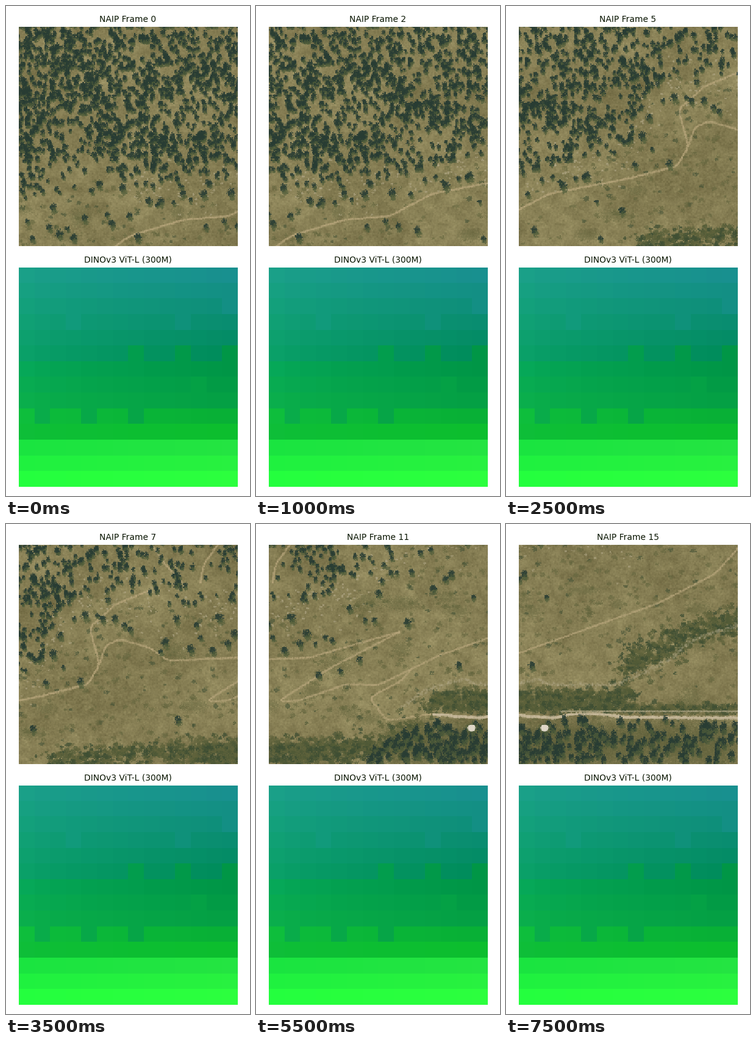
Recreate the animation shown at these times as a matplotlib script. Size 400 by 800 pixels, loop 8000 ms.

```python
import numpy as np
import matplotlib.pyplot as plt
from matplotlib.animation import FuncAnimation
from matplotlib.colors import to_rgb

FRAMES, INTERVAL = 16, 500
SIDE, SCALE, STEP = 224, 1.603, 45.42   # view in cells, pixels per cell, cells per frame
LEFT, TOP = 21, 34                      # stage position of the aerial view
WIDTH = SIDE + int(np.ceil(STEP * (FRAMES - 1))) + 1
EAST, SOUTH = LEFT + WIDTH * SCALE, TOP + SIDE * SCALE

rng = np.random.default_rng(7)

GROUND = np.array([134, 126, 84])
SHADOW, CROWN = (40, 60, 51), (80, 93, 58)
SCRUB, DARK_SCRUB = (96, 99, 60), (62, 78, 51)
PATH, ROAD, ROCK = (184, 166, 124), (200, 186, 156), (178, 168, 136)


def smooth_noise(sigma):
    """Unit-variance noise blurred to the given length in cells."""
    fy = np.fft.fftfreq(SIDE)[:, None]
    fx = np.fft.rfftfreq(WIDTH)[None]
    spectrum = np.fft.rfft2(rng.normal(size=(SIDE, WIDTH)))
    spectrum *= np.exp(-2 * (np.pi * sigma) ** 2 * (fx ** 2 + fy ** 2))
    field = np.fft.irfft2(spectrum, s=(SIDE, WIDTH))
    return field / field.std()


land = GROUND + (4.5 * smooth_noise(.5) + 4 * smooth_noise(3)
                 + 4 * smooth_noise(22))[..., None] * [1, .95, .8]
clumps = smooth_noise(8)


def cell(x, y):
    return (x - LEFT) / SCALE, (y - TOP) / SCALE


def blob(x, y, rx, ry, color, alpha=1.0, rough=.3, edge=2.0):
    """Blend a ragged ellipse, given in stage pixels, into the land."""
    cx, cy = cell(x, y)
    rx, ry = rx / SCALE, ry / SCALE
    x0, x1 = max(0, int(cx - rx - 1)), min(WIDTH, int(cx + rx + 3))
    y0, y1 = max(0, int(cy - ry - 1)), min(SIDE, int(cy + ry + 3))
    if x0 >= x1 or y0 >= y1:
        return
    gx, gy = np.arange(x0, x1)[None] + .5, np.arange(y0, y1)[:, None] + .5
    d = ((gx - cx) / rx) ** 2 + ((gy - cy) / ry) ** 2
    d = d + rough * rng.normal(size=d.shape)
    mask = (np.clip((1 - d) * edge, 0, 1) * alpha)[..., None]
    view = land[y0:y1, x0:x1]
    view += mask * (np.array(color) - view)


def tree(x, y, r=4.5, tall=1.35):
    blob(x, y - r * .4, r, r * tall, SHADOW, .9)
    blob(x + r * .35, y + r * .6, r * .85, r * .95, CROWN, .75)


def along(points, spacing=1.0):
    """Evenly spaced points on a softened polyline."""
    p = np.array(points, float)
    s = np.r_[0, np.cumsum(np.hypot(*np.diff(p, axis=0).T))]
    t = np.arange(0, s[-1], spacing)
    n = max(3, int(16 / spacing))
    padding = (n // 2, n - 1 - n // 2)
    return np.transpose([
        np.convolve(np.pad(np.interp(t, s, axis), padding, mode="edge"),
                    np.ones(n) / n, "valid") for axis in p.T])


def trail(points, radius=1.8, alpha=.36, color=PATH, jitter=.5):
    for x, y in along(points) + rng.normal(0, jitter, (len(along(points)), 2)):
        blob(x, y, radius, radius, color, alpha)


def scrub_belt(points, spread, density):
    for x, y in along(points, 1 / density):
        r = rng.uniform(2, 5)
        color = (SCRUB, (82, 91, 55), DARK_SCRUB)[rng.integers(3)]
        blob(*rng.normal((x, y), spread), r * 1.2, r, color, .75, .4)


forest_edge = np.array([(21, 318), (100, 305), (160, 268), (230, 302), (330, 295),
                        (450, 260), (560, 242), (610, 140), (660, 108), (820, 148),
                        (960, 110), (1080, 20)])


def depth(x, y):
    """How far a point lies inside the northern forest."""
    return np.interp(x, *forest_edge.T) - y


# Scrub patches, bushes and pale stones on the open grass
for _ in range(45):
    x, y = rng.uniform(LEFT, EAST), rng.uniform(TOP, SOUTH)
    if depth(x, y) < -15:
        blob(x, y, rng.uniform(10, 34), rng.uniform(8, 20), SCRUB, .4, .4, 1.2)
for _ in range(1500):
    x, y = rng.uniform(LEFT, EAST), rng.uniform(TOP, SOUTH)
    if depth(x, y) < 0:
        r = rng.uniform(1.5, 4.5)
        blob(x, y, r * 1.25, r, SCRUB if rng.random() < .8 else DARK_SCRUB, .55, .4)
for x in rng.uniform(200, 1300, 420):
    y = np.interp(x, *forest_edge.T) + rng.normal(5, 22)
    blob(x, y, 2.2, 1.7, ROCK, .6, .4)

# Footpaths: the main one, its fork with a hairpin, a loop, and two northern spurs
trail([(178, 394), (204, 376), (291, 350), (366, 344), (434, 308), (564, 283),
       (645, 262), (663, 230), (647, 170), (690, 132), (748, 108)], alpha=.42)
trail([(662, 232), (673, 200), (695, 189), (745, 203), (776, 224), (890, 219),
       (1040, 176), (925, 235), (840, 290), (870, 290), (950, 262), (1002, 264),
       (1101, 216), (1202, 180), (1342, 130), (1435, 82), (1474, 38)])
trail([(1056, 238), (1041, 256), (988, 285), (1016, 322), (1092, 311)])
trail([(748, 34), (772, 68), (808, 108)])
trail([(858, 34), (834, 66), (828, 100)])

# Ground of the southern wood, scrub belts and the stony stream
for x in np.arange(1020, EAST, 12):
    blob(x, 360, 28, 42, (94, 96, 58), .35, .3, 1.2)
scrub_belt([(580, 388), (744, 374), (1000, 366)], 9, 1.6)
scrub_belt([(800, 380), (1000, 368), (1070, 340)], 14, 1.8)
scrub_belt([(1085, 297), (1140, 288), (1300, 282)], 8, 2.6)
scrub_belt([(1113, 300), (EAST, 303)], 4, 1)
scrub_belt([(1280, 238), (1392, 180), (EAST, 160)], 13, 2.6)
trail([(1041, 300), (1081, 272), (1142, 254), (1165, 264), (1272, 264),
       (1362, 222), (1392, 192), (EAST, 165)], 1.8, .28, ROCK, 2)

# Road with its fainter northern edge
trail([(1090, 312), (1172, 318), (1200, 311), (1245, 311), (1290, 317), (EAST, 318)],
      2.6, .5, ROAD)
trail([(1180, 307), (EAST, 307)], 1.7, .35, ROCK, .3)

# Northern forest: thins out at its lower edge and toward the east
candidates = np.c_[rng.uniform(TOP - 4, 330, 6600), rng.uniform(LEFT - 3, 1080, 6600)]
for y, x in candidates[candidates[:, 0].argsort()]:
    cx, cy = (int(v) for v in np.clip(cell(x, y), 0, (WIDTH - 1, SIDE - 1)))
    inside = depth(x, y)
    chance = np.clip(.3 + inside / 90, 0, 1) * np.interp(x, [250, 600, 1000], [1, .65, .35])
    if inside > 0 and rng.random() < chance * np.clip(.85 + .3 * clumps[cy, cx], .2, 1):
        tree(x, y, rng.uniform(2.8, 4.8), rng.uniform(1.1, 1.6))

# Lone trees, mostly not far below the forest
for x in np.arange(30, 1170, 12):
    y = np.interp(x, *forest_edge.T) + 12 + rng.exponential(65)
    if y < SOUTH:
        tree(x + rng.uniform(-6, 6), y, rng.uniform(3.8, 7), 1.1)

# Southern wood: taller trees, closest together in the west
for _ in range(380):
    x, y = rng.uniform(985, EAST), rng.uniform(320, SOUTH)
    start = np.interp(x, [985, 1100], [372, 322])
    if y > start and rng.random() < np.interp(x, [1180, 1260], [.85, .5]):
        tree(x, y, rng.uniform(3.5, 6.5), rng.uniform(1.4, 2.1))

# House
blob(1155, 334, 11, 9, CROWN, .8)
blob(1155, 334, 7, 6, (222, 214, 198), 1, 0, 4)
land = np.clip(land, 0, 255).astype(np.uint8)

# Feature grid: left and right colours at key rows, blended between
KEYS = {0: "1aa088 18908f", 5: "0aa068 008c5c", 6: "06a858 009646",
        8: "0aae4c 04a044", 9: "0ebe3c 08b036", 10: "0ebe38 0cbe2e",
        11: "1ae440 24e442", 13: "24ff3e 2cff3e"}
ends = np.array([[to_rgb("#" + c) for c in pair.split()] for pair in KEYS.values()])
ends = ends.reshape(len(KEYS), 6)
rows = np.transpose([np.interp(range(14), list(KEYS), channel) for channel in ends.T])
ramp = np.linspace(0, 1, 14)[None, :, None] ** .8
grid = rows[:, None, :3] * (1 - ramp) + rows[:, None, 3:] * ramp

# A few cells take the colour of the neighbouring row
for row, neighbour, columns in [(2, 1, [13]), (3, 2, [3, 10]), (5, 6, [7, 10, 13]),
                                (7, 8, [11]), (9, 8, [1, 4, 7])]:
    grid[row, columns] = grid[neighbour, columns]

plt.rcParams["font.family"] = "DejaVu Sans"
fig, (top_ax, bottom_ax) = plt.subplots(2, 1, figsize=(4, 8), dpi=100)


def panel(ax, image, title):
    picture = ax.imshow(image, interpolation="nearest")
    ax.axis("off")
    return picture, ax.set_title(title, fontsize=10, color="#081400")


aerial, heading = panel(top_ax, land[:, :SIDE], "NAIP Frame 0")
panel(bottom_ax, grid, "DINOv3 ViT-L (300M)")
fig.tight_layout()


def update(n):
    start = round(STEP * n)
    aerial.set_data(land[:, start:start + SIDE])
    heading.set_text(f"NAIP Frame {n}")
    return aerial, heading


anim = FuncAnimation(fig, update, frames=FRAMES, interval=INTERVAL,
                     repeat=True, repeat_delay=0)
plt.show()
```
